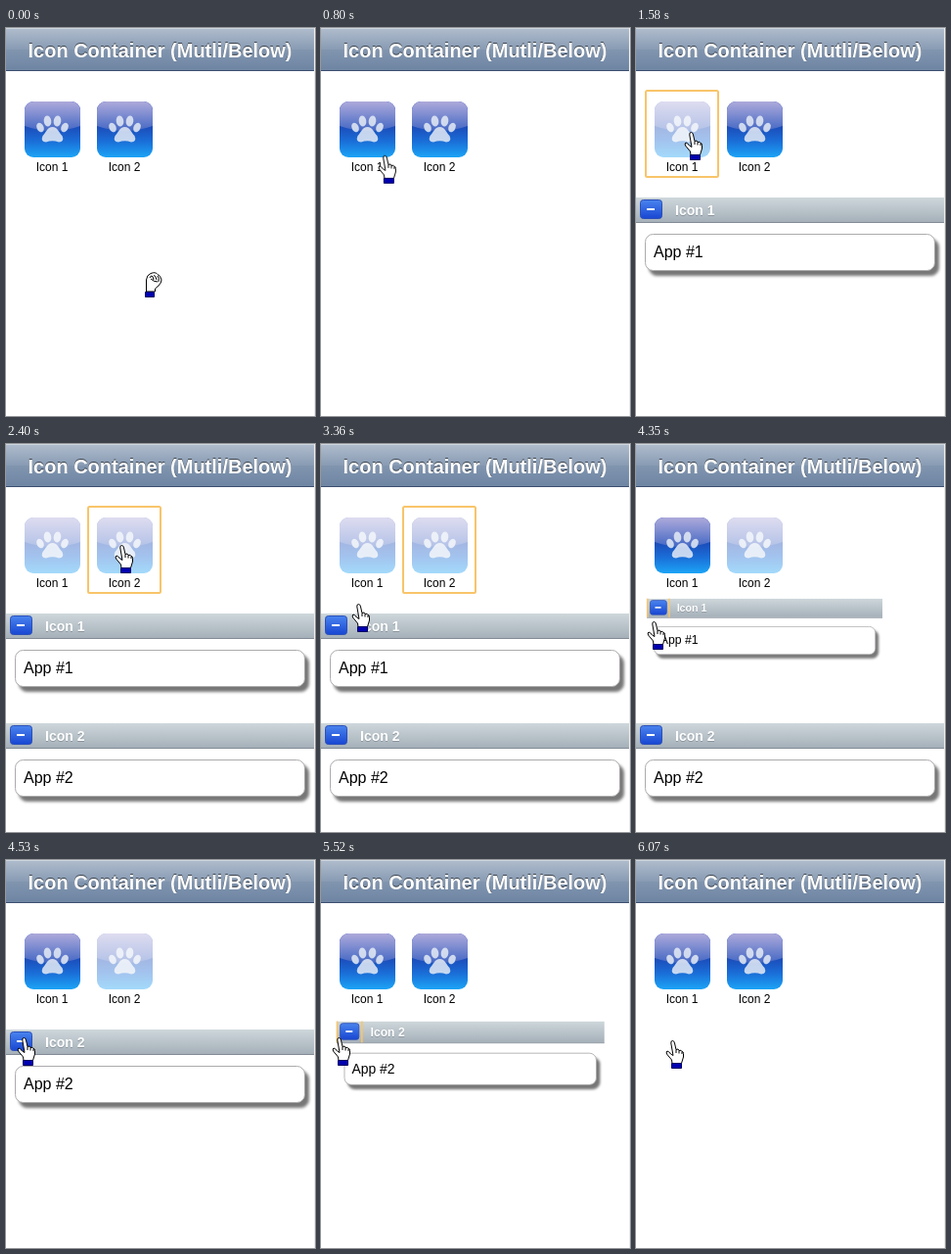
These frames come from a looping animation (316 px wide and 396 px high, 6.6 s). An HTML page:

```html
<!DOCTYPE html>
<html lang="en">
<head>
<meta charset="utf-8">
<title>Icon Container</title>
<style>
html, body { margin: 0; width: 100%; height: 100%; overflow: hidden; background: #fff; }
svg { display: block; width: 316px; height: 396px; font-family: "Liberation Sans", Arial, sans-serif; }

.title { font: bold 20px "Liberation Sans", Arial, sans-serif; fill: #fff; text-anchor: middle; filter: drop-shadow(0 -1px 0 #0009); }
.label { font-size: 12px; text-anchor: middle; }
.name { font-size: 14px; font-weight: bold; fill: #fff; filter: drop-shadow(0 1px 0 #8a949c); }
.app { font-size: 16px; }
.card { fill: #fff; stroke: #adaaad; filter: drop-shadow(4px 5px 1.5px #777); }
.ring { fill: none; stroke: #f8c56a; stroke-width: 2; }

/* One loop is 6.6 s: 1% = 66 ms */
.icon1, .icon2, .ring, .panel, .fist, .hand { animation: 6.6s step-end infinite; }
.icon1 { animation-name: fade1; }
.icon2 { animation-name: fade2; }
.focus1 { animation-name: focus1; }
.focus2 { animation-name: focus2; }
.close1 { animation-name: close1; }
.close2 { animation-name: close2; }
.panel1 { animation-name: panel1; transform-origin: 47px 108px; }
.panel2 { animation-name: panel2; transform-origin: 121px 108px; }
.fist { animation-name: fist; }
.hand { animation-name: hand; }
.cursor { animation: move 6.6s infinite; }

@keyframes fade1 { 0% { opacity: 1 } 13.93% { opacity: .4 } 65% { opacity: 1 } }
@keyframes fade2 { 0% { opacity: 1 } 34.39% { opacity: .4 } 82.72% { opacity: 1 } }
@keyframes focus1 { 0% { opacity: 0 } 13.93% { opacity: 1 } 34.39% { opacity: 0 } }
@keyframes focus2 { 0% { opacity: 0 } 34.39% { opacity: 1 } 62.87% { opacity: 0 } }
@keyframes close1 { 0% { opacity: 0 } 62.87% { opacity: 1 } }
@keyframes close2 { 0% { opacity: 0 } 80.75% { opacity: 1 } }
@keyframes fist { 0% { opacity: 1 } .9% { opacity: 0 } }
@keyframes hand { 0% { opacity: 0 } .9% { opacity: 1 } }

@keyframes panel1 {
  0% { visibility: hidden; transform: none }
  16.96% { visibility: visible }
  65.9% { transform: scale(.765) }
  66.81% { transform: scale(.36) }
  67.72% { transform: scale(.12) }
  68.63% { visibility: hidden }
}
@keyframes panel2 {
  0% { visibility: hidden; transform: translateY(112px) }
  36.36% { visibility: visible }
  68.63% { transform: none }
  83.63% { transform: scale(.87) }
  84.54% { transform: scale(.45) }
  85.45% { transform: scale(.18) }
  86.36% { transform: scale(.05) }
  87.27% { visibility: hidden }
}
@keyframes move {
  0% { transform: translate(142px, 249px); animation-timing-function: step-end }
  3.03% { transform: translate(142px, 249px); animation-timing-function: steps(12) }
  13.93% { transform: translate(41px, 106px); animation-timing-function: step-end }
  23.93% { transform: translate(49px, 106px); animation-timing-function: steps(6) }
  29.39% { transform: translate(111px, 103px); animation-timing-function: step-end }
  44.54% { transform: translate(111px, 103px); animation-timing-function: steps(7) }
  50.9% { transform: translate(31px, 163px); animation-timing-function: steps(4) }
  54.69% { transform: translate(23px, 168px); animation-timing-function: steps(7) }
  61.06% { transform: translate(11px, 181px); animation-timing-function: step-end }
  88.33% { transform: translate(11px, 181px); animation-timing-function: steps(2) }
  90.15% { transform: translate(18px, 183px); animation-timing-function: steps(2) }
  91.96%, 100% { transform: translate(30px, 184px); animation-timing-function: step-end }
}
</style>
</head>
<body>
<svg viewBox="0 0 316 396">
  <defs>
    <linearGradient id="bar" x2="0" y2="1">
      <stop stop-color="#b0bccd"/><stop offset=".5" stop-color="#889bb3"/>
      <stop offset=".5" stop-color="#8195af"/><stop offset="1" stop-color="#6d84a2"/>
    </linearGradient>
    <linearGradient id="silver" x2="0" y2="1">
      <stop stop-color="#ced7db"/><stop offset="1" stop-color="#a5b0b9"/>
    </linearGradient>
    <linearGradient id="button" x2="0" y2="1">
      <stop stop-color="#4a84ee"/><stop offset="1" stop-color="#1846d2"/>
    </linearGradient>
    <linearGradient id="base" x2="0" y2="1">
      <stop offset=".4" stop-color="#1c46b4"/><stop offset=".7" stop-color="#1a6cd6"/><stop offset="1" stop-color="#1ca4f6"/>
    </linearGradient>
    <linearGradient id="gloss" x2="0" y2="1">
      <stop stop-color="#aeaadb"/><stop offset="1" stop-color="#4468c4"/>
    </linearGradient>
    <clipPath id="round"><rect width="57" height="57" rx="9"/></clipPath>

    <g id="icon">
      <g clip-path="url(#round)">
        <rect width="57" height="57" fill="url(#base)"/>
        <path d="M0 0H57V25Q28.5 35 0 25Z" fill="url(#gloss)"/>
      </g>
      <g fill="#e4ebf5" opacity=".85">
        <path d="M28.5 26C34 26 35 32 38.500 35Q41 41 35 41.500Q28.500 39 22 41.500Q16 41 18.500 35C22 32 23 26 28.500 26Z"/>
        <ellipse cx="16" cy="26.500" rx="3.500" ry="5" transform="rotate(-25 16 26.500)"/>
        <ellipse cx="23.500" cy="20" rx="3.800" ry="5.500" transform="rotate(-8 23.500 20)"/>
        <ellipse cx="33.500" cy="20" rx="3.800" ry="5.500" transform="rotate(8 33.500 20)"/>
        <ellipse cx="41" cy="26.500" rx="3.500" ry="5" transform="rotate(25 41 26.500)"/>
      </g>
    </g>

    <g id="panel">
      <rect y="173" width="315" height="25" fill="url(#silver)"/>
      <rect y="198" width="315" height="1" fill="#828b96"/>
      <rect x="4.500" y="175.500" width="22" height="19" rx="3" fill="url(#button)" stroke="#2c50b8"/>
      <rect x="11" y="184" width="8" height="2" fill="#fff"/>
      <rect class="card" x="9.500" y="210.500" width="296" height="37" rx="8"/>
    </g>
  </defs>

  <rect x="315" width="1" height="396" fill="#eee"/>
  <rect width="315" height="44" fill="url(#bar)"/>
  <rect width="315" height="1" fill="#cdd5df"/>
  <rect y="43" width="315" height="1" fill="#3c4f70"/>
  <text class="title" x="157.500" y="30">Icon Container (Mutli/Below)</text>

  <g class="icon1"><use href="#icon" x="19" y="75"/></g>
  <g class="icon2"><use href="#icon" x="93" y="75"/></g>
  <text class="label" x="47" y="146">Icon 1</text>
  <text class="label" x="121" y="146">Icon 2</text>
  <rect class="ring focus1" x="10" y="64" width="74" height="88" rx="1.500"/>
  <rect class="ring focus2" x="84" y="64" width="74" height="88" rx="1.500"/>

  <g class="panel panel1">
    <use href="#panel"/>
    <text class="name" x="40" y="191">Icon 1</text>
    <text class="app" x="18" y="234">App #1</text>
    <path class="ring close1" d="M1 173V198M30 173V198"/>
  </g>
  <g class="panel panel2">
    <use href="#panel"/>
    <text class="name" x="40" y="191">Icon 2</text>
    <text class="app" x="18" y="234">App #2</text>
    <path class="ring close2" d="M1 173V198M30 173V198"/>
  </g>

  <g class="cursor" fill="#fff" stroke="#000" stroke-linejoin="round">
    <g class="fist">
      <path d="M1.500 20V8Q2 3 6 1.500Q11-.5 13 2.500Q16 3.500 17 8Q17 11 14 14L10.500 17V20Z"/>
      <path d="M5 6Q6 3 8 4.500L9 8M9 3.500Q11 3 12 8M13 4Q15 6 14 10M6 7Q9 10 13 10" fill="none"/>
      <rect x=".5" y="20.500" width="9" height="5" fill="#0000b0" stroke="#000060"/>
    </g>
    <g class="hand">
      <path d="M7 23.500L6.500 20L1.500 14Q.5 11.500 2 11Q3.500 11 5.500 14L8 15.500L5.800 3Q5.500.5 7.500.5Q9 .5 9.500 3L11 9.500Q13.500 8 14 10.500Q16.500 9.500 17 11.500Q18.500 11.500 18.500 13.500V17L16.500 23.500Z"/>
      <path d="M11 9.500V13M14 10.500V13.500M17 11.500V14" fill="none"/>
      <rect x="6.500" y="23.500" width="10" height="5" fill="#0000b0" stroke="#000060"/>
    </g>
  </g>
</svg>
</body>
</html>
```
